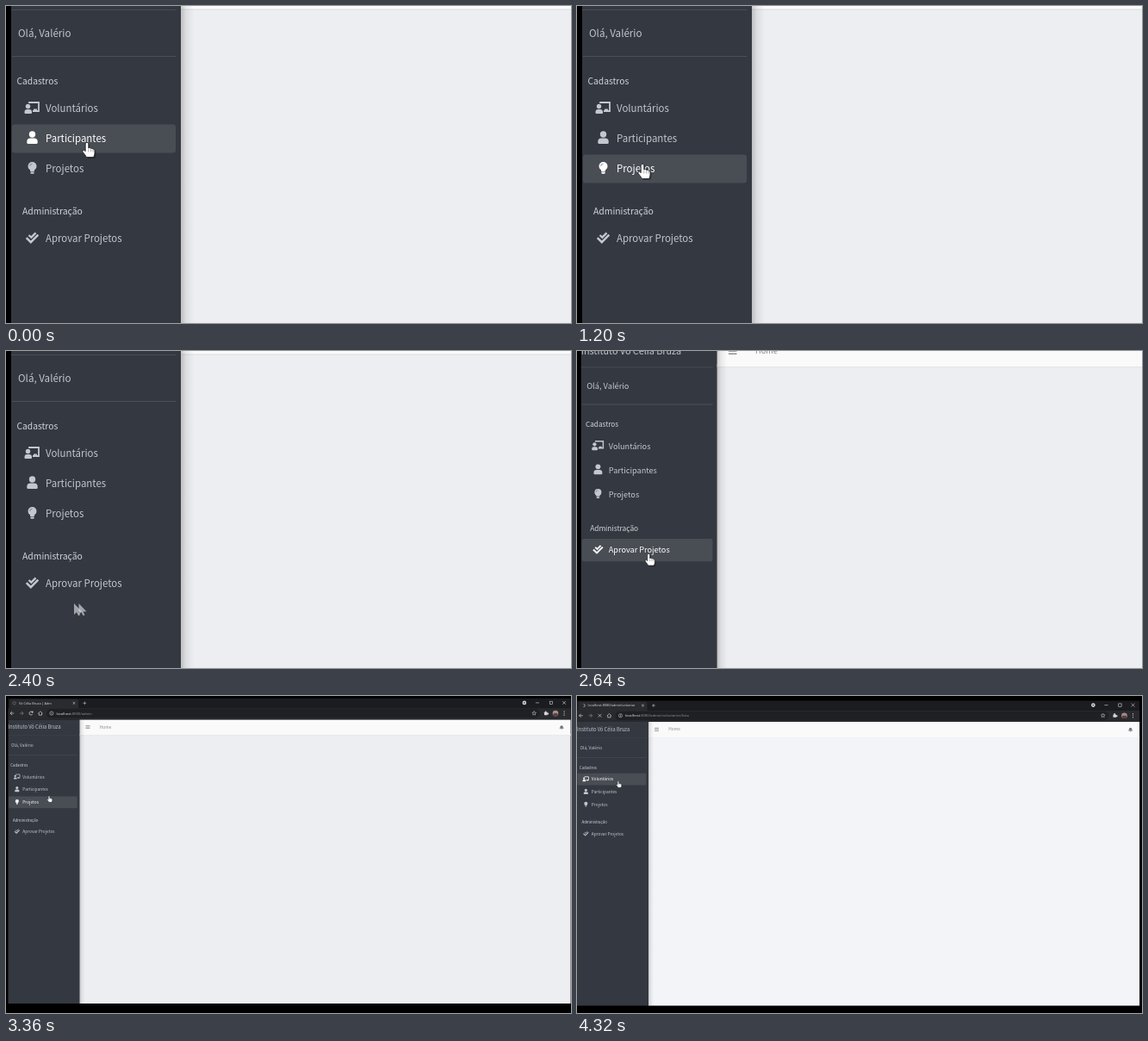
An HTML page with a canvas for the animation above (4.44 s loop, 656 by 368 pixels).

```html
<!DOCTYPE html>
<html lang="pt-BR">
<head>
<meta charset="utf-8">
<title>Painel</title>
<style>
html, body { margin: 0; width: 100%; height: 100%; overflow: hidden; background: #000; }
canvas { display: block; }
</style>
</head>
<body>
<canvas id="stage" width="656" height="368"></canvas>
<script>
const ctx = document.getElementById('stage').getContext('2d');
const LOOP = 4440, STEP = 120;
const UI = '"Noto Sans CJK JP", "Noto Sans CJK SC", "Noto Sans CJK", Lato, sans-serif';
const CHROME = '"Open Sans", "Noto Sans", sans-serif';
const PAGE = { left: 6, right: 1561, top: -98, bottom: 745, side: 203 };

// Times in ms, followed by values in page coordinates.
const cameraKeys = [[0, 1, 0, 0], [2400, 1, 0, 0], [3000, .42, 0, 44], [3600, .42, 0, 44], [4200, .42, -2.5, 46.7]];
const cursorKeys = [
  [0, 94, 158], [120, 88, 182], [240, 66, 222], [360, 45, 208], [480, 56, 170], [600, 80, 156],
  [840, 90, 176], [1200, 76, 183], [1440, 102, 186], [1800, 31, 193], [2160, 70, 264],
  [2400, 79, 293], [2640, 104, 275], [2880, 120, 263], [3000, 120, 263], [3360, 119, 171],
  [3600, 120, 124], [4440, 120, 124]
];
const hoverKeys = [[0, 1], [840, 2], [2040, -1], [2160, 3], [2280, -1], [2520, 3], [3240, 2], [3480, 1], [3600, 0]];

const items = [
  { label: 'Voluntários', y: 119, icon: teacherIcon },
  { label: 'Participantes', y: 154, icon: userIcon },
  { label: 'Projetos', y: 189, icon: bulbIcon },
  { label: 'Aprovar Projetos', y: 270, icon: checksIcon }
];

function interpolate(keys, t, ease) {
  const i = Math.max(1, keys.findIndex(k => k[0] >= t));
  const a = keys[i - 1], b = keys[i];
  const p = ease((t - a[0]) / (b[0] - a[0]));
  return a.slice(1).map((v, n) => v + (b[n + 1] - v) * p);
}
const sine = p => (1 - Math.cos(Math.PI * p)) / 2;
const linear = p => p;

function rect(x, y, w, h, color, radius = 0) {
  ctx.fillStyle = color;
  ctx.beginPath();
  ctx.roundRect(x, y, w, h, radius);
  ctx.fill();
}
function disc(x, y, r, color) {
  ctx.fillStyle = color;
  ctx.beginPath();
  ctx.arc(x, y, r, 0, 7);
  ctx.fill();
}
function line(points, color, width = 1) {
  ctx.strokeStyle = color;
  ctx.lineWidth = width;
  ctx.beginPath();
  points.forEach(([x, y]) => ctx.lineTo(x, y));
  ctx.stroke();
}
function ring(x, y, r, color, width = 1.5, from = 0, to = 2 * Math.PI) {
  ctx.strokeStyle = color;
  ctx.lineWidth = width;
  ctx.beginPath();
  ctx.arc(x, y, r, from, to);
  ctx.stroke();
}
function text(value, x, y, size, color, family = UI, weight = 400) {
  ctx.font = `${weight} ${size}px ${family}`;
  ctx.fillStyle = color;
  ctx.fillText(value, x, y);
  return x + ctx.measureText(value).width;
}

function teacherIcon(color) {
  line([[27, 113], [27, 112], [38, 112], [38, 122], [31, 122]], color, 1.8);
  rect(32, 119.5, 4, 2.5, color);
  disc(25.5, 116.5, 2.7, color);
  rect(21.5, 120, 8.5, 5, color, [3, 3, 1, 1]);
}
function userIcon(color) {
  disc(30.5, 149, 3.7, color);
  rect(24.3, 153.5, 12.4, 6.5, color, [4, 4, 1.5, 1.5]);
}
function bulbIcon(color) {
  disc(30.5, 186, 5, color);
  rect(28, 189, 5, 3, color);
  rect(28.3, 192.6, 4.4, 2.2, color, 1);
  ring(30.5, 186, 2.8, '#6d7279', .8, Math.PI, Math.PI * 1.5);
}
function checksIcon(color) {
  line([[26.5, 266], [29.3, 268.6], [34.5, 263.4]], color, 2.3);
  line([[23.7, 269.2], [28.8, 274.2], [37.3, 265.7]], color, 2.5);
}

function drawPage(loading, hover) {
  const { left, right, side, bottom } = PAGE;
  rect(side, 0, right - side, bottom, loading ? '#f3f4f8' : '#edeef1');
  rect(side, -40, right - side, 44, '#fafafa');
  rect(side, 3.5, right - side, 1, '#dcdee1');
  for (const y of [-23, -19, -15]) rect(220, y - .7, 12, 1.5, '#777');
  text('Home', 259, -15, 11.45, '#85878a');
  rect(1532, -23.5, 8, 7, '#70757a', [4, 4, 0, 0]);
  rect(1530, -17, 12, 2, '#70757a', 1);
  disc(1536, -14, 1.6, '#70757a');

  const shadow = ctx.createLinearGradient(side, 0, side + 15, 0);
  shadow.addColorStop(0, 'rgba(0,0,0,.2)');
  shadow.addColorStop(.4, 'rgba(0,0,0,.07)');
  shadow.addColorStop(1, 'rgba(0,0,0,0)');
  rect(side, -40, 15, bottom + 40, shadow);

  rect(left, -40, side - left, bottom + 40, '#343840');
  text('Instituto Vó Célia Bruza', 6, -14, 13.5, '#c3c6cb', UI, 300);
  rect(left, 4, 191, 1, '#4a4e55');
  text('Olá, Valério', 14, 36, 11.6, '#c2c7d0');
  rect(left + 1, 58, 190, 1, '#4d5157');
  text('Cadastros', 12.5, 90.5, 10.25, '#d0d4db');
  text('Administração', 19, 242, 10.4, '#d0d4db');
  items.forEach(({ label, y, icon }, i) => {
    const active = i === hover;
    const color = active ? '#fff' : '#c2c7d0';
    if (active) rect(7, y - 16.5, 190, 33, '#494d54', 3);
    icon(color);
    text(label, 46, y + 4, 11.45, color);
  });
}

function drawBrowser(loading) {
  const { left, right, top } = PAGE, light = '#d5d7da', dim = '#85888c';
  rect(left, top, right - left, 58, '#1b1c1f');
  rect(left + 4, top + 2, 190, 26, '#2a2b2f', [6, 6, 0, 0]);
  rect(left, -71, right - left, 31, '#292a2e');
  rect(112, -69, 1364, 25, '#1f2023', 12);

  if (loading) ring(24, -85, 4, light, 1.5, -1.6, 1.6);
  else ring(23, -85, 4, '#777b80', 1.5);
  text(loading ? 'localhost:8080/admin/voluntar' : 'Vó Célia Bruza | Adm', 36, -82, 9.1, '#dadce0', CHROME);
  cross(188, -85, 3, light);
  line([[213, -85], [222, -85]], light, 1.3);
  line([[217.5, -89.5], [217.5, -80.5]], light, 1.3);

  arrow(17, -1, light);
  arrow(43, 1, dim);
  if (loading) cross(69, -57, 4.5, light);
  else {
    ring(69, -57, 4.6, light, 1.8, .4, 5.5);
    rect(71, -62.5, 4, 4, light);
  }
  line([[89, -56.5], [95, -62.5], [101, -56.5]], light, 1.6);
  line([[91, -58], [91, -52], [99, -52], [99, -58]], light, 1.6);
  ring(126, -57, 5, light, 1.3);
  rect(125.3, -58, 1.4, 4, light);
  rect(125.3, -60, 1.4, 1.3, light);
  const end = text('localhost', 139, -53.5, 9.8, '#e8eaed', CHROME);
  text(':8080/admin' + (loading ? '/voluntarios/lista' : ''), end, -53.5, 9.8, '#92959a', CHROME);

  star(1460, -57, light);
  rect(1488, -60, 9, 8, light, 1);
  disc(1492, -61, 2.3, light);
  disc(1498, -56, 2.3, light);
  disc(1519, -57, 8, '#a58d86');
  rect(1513, -57, 12, 8, '#5b4244', 3);
  for (const y of [-62, -57, -52]) disc(1543, y, 1.4, light);
  disc(1433, -86, 5.5, '#cfd1d4');
  disc(1433, -86, 1.8, '#34363a');
  line([[1464, -86], [1474, -86]], light, 1.4);
  ctx.strokeRect(1503, -90, 8, 8);
  cross(1543, -86, 4.5, light);
}
function cross(x, y, r, color) {
  line([[x - r, y - r], [x + r, y + r]], color, 1.5);
  line([[x - r, y + r], [x + r, y - r]], color, 1.5);
}
function arrow(x, direction, color) {
  line([[x - 5, -57], [x + 5, -57]], color, 1.6);
  line([[x, -62], [x + 5 * direction, -57], [x, -52]], color, 1.6);
}
function star(x, y, color) {
  const points = Array.from({ length: 11 }, (_, i) => {
    const angle = Math.PI * (i / 5 - .5), r = i % 2 ? 2.6 : 6;
    return [x + r * Math.cos(angle), y + r * Math.sin(angle)];
  });
  line(points, color, 1.2);
}

const handShape = new Path2D('M-1.8 1.5Q0-1.2 1.8 1.5V7Q3.4 5.6 4.6 7.4Q6.3 6.4 7.1 8.2Q9 7.6 9 10V13Q9 15 7.6 17.5H-.5Q-2.2 14.5-5 11.3Q-5.6 9-3.6 9.2L-1.8 10.6Z');
const pointerShape = new Path2D('M0 0V13L3 10.2L5 14.3L7 13.4L5 9.4H9Z');

function drawCursor(x, y, isHand) {
  ctx.save();
  ctx.translate(x, y);
  if (isHand) {
    ctx.fillStyle = 'rgba(0,0,0,.3)';
    ctx.translate(1.5, 1.5);
    ctx.fill(handShape);
    ctx.translate(-1.5, -1.5);
    ctx.fillStyle = '#fff';
    ctx.strokeStyle = '#25272b';
    ctx.lineWidth = .9;
    ctx.fill(handShape);
    ctx.stroke(handShape);
    for (const gap of [1.8, 4.6, 7]) line([[gap, 8], [gap, 11.5]], '#777', .6);
  } else {
    // Motion blur leaves two soft pointers.
    ctx.fillStyle = 'rgba(235,237,240,.6)';
    ctx.fill(pointerShape);
    ctx.translate(5.5, 0);
    ctx.fill(pointerShape);
  }
  ctx.restore();
}

function draw(now) {
  const t = Math.floor(now % LOOP / STEP) * STEP;
  const [scale, x, y] = t >= 4200 ? cameraKeys.at(-1).slice(1) : interpolate(cameraKeys, t, sine);
  const hover = hoverKeys.findLast(k => k[0] <= t)[1];
  ctx.setTransform(1, 0, 0, 1, 0, 0);
  rect(0, 0, 656, 368, '#000');
  ctx.setTransform(scale, 0, 0, scale, x, y);
  drawPage(t >= 3960, hover);
  drawBrowser(t >= 4320);
  drawCursor(...interpolate(cursorKeys, t, linear), hover >= 0);
  requestAnimationFrame(() => draw(performance.now()));
}
draw(0);
</script>
</body>
</html>
```
